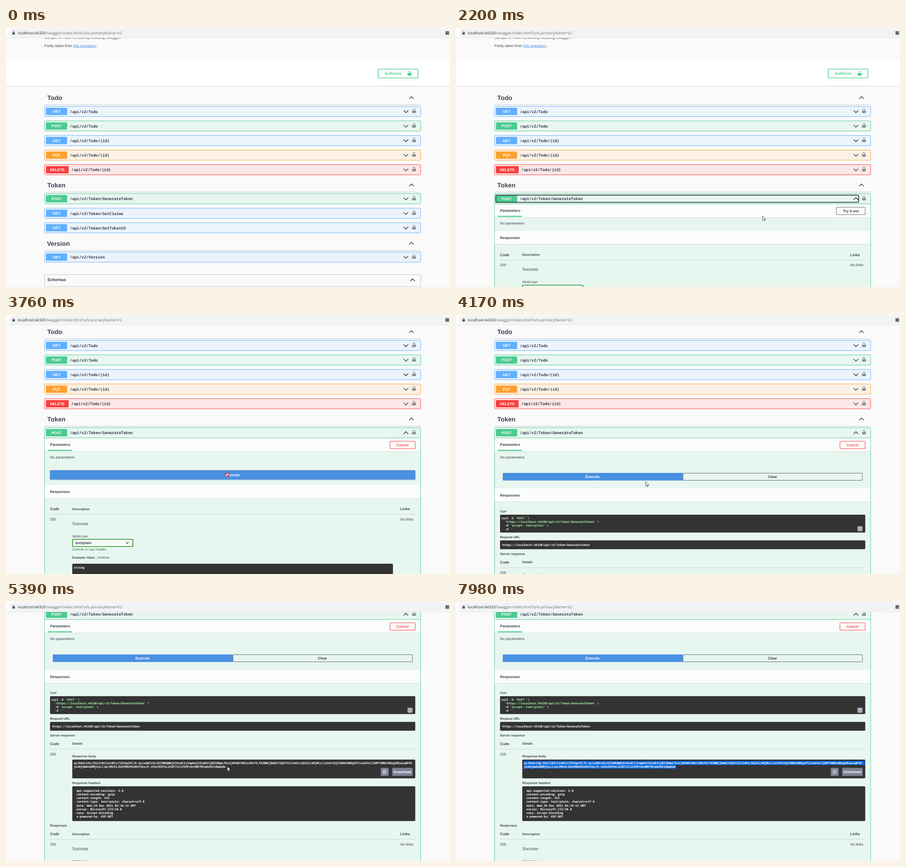
Animation, 978 px wide and 572 px high, one loop 8000 ms. Source, as an HTML page:

```html
<!DOCTYPE html>
<html lang="en">
<head>
<meta charset="utf-8">
<title>API page</title>
<style>
html, body { margin: 0; width: 100%; height: 100%; overflow: hidden; background: #fafafa; }
svg { display: block; width: 978px; height: 572px; }
text { font: 8.16px "Liberation Sans", Arial, sans-serif; fill: #3b4151; white-space: pre; text-rendering: geometricPrecision; }
.b { font-weight: 700; }
.h { font-size: 13.9px; font-weight: 700; }
.m { font-size: 9.33px; }
.s { font-size: 7px; }
.i { font-style: italic; }
.w { fill: #fff; }
.mid { text-anchor: middle; }
.path { font: 700 8.55px "Noto Sans Mono", "DejaVu Sans Mono", monospace; }
.code { font: 700 6.42px "Noto Sans Mono", "DejaVu Sans Mono", monospace; fill: #fff; }
.url { font: 8.34px "Open Sans", "Noto Sans", sans-serif; fill: #6a6e72; }
.str { fill: #a2fca2; }
.ok { fill: #1c6b3c; }
.lt { font: 6.4px "Noto Sans Mono", monospace; }
</style>
</head>
<body>
<svg id="stage" viewBox="0 0 978 572"></svg>
<script>
const LOOP = 8000;
const BLUE = '#61affe', GREEN = '#49cc90', ORANGE = '#fca130', RED = '#f93e3e';

// ---- drawing helpers ----
const text = (x, y, s, cls = '') => `<text x="${x}" y="${y}" class="${cls}">${s}</text>`;
const rect = (x, y, w, h, fill, more = '') => `<rect x="${x}" y="${y}" width="${w}" height="${h}" fill="${fill}" ${more}/>`;
const group = (id, body) => `<g id="${id}">${body}</g>`;
const frame = (x, y, w, h, color, width = 1.3, fill = 'none') =>
  rect(x, y, w, h, fill, `rx="2" stroke="${color}" stroke-width="${width}"`);
const rule = (y, x1 = 84.5, x2 = 913.5, color = '#3b415148') =>
  `<path d="M${x1} ${y}H${x2}" stroke="${color}" stroke-width=".9"/>`;
const chevron = (x, y, up, r = 5) => {
  const d = up ? -r : r;
  return `<path d="M${x - r} ${y - d / 2}l${r} ${d} ${r} ${-d}" fill="none" stroke="#222" stroke-width="1.25"/>`;
};
const lock = (x, y, color) => `<path d="M${x + 6.3} ${y + 5}v-2.1a2.1 2.1 0 0 0-4.2 0v.6" fill="none" stroke="${color}" stroke-width="1.3"/>`
  + rect(x, y + 4.7, 8.4, 5.3, color, 'rx=".8"');
const dark = (x, y, w, h) => rect(x, y, w, h, '#333', 'rx="2"');
const copyButton = (x, y, w, h) => {
  const cx = x + w / 2, cy = y + h / 2;
  return rect(x, y, w, h, '#7d8293', 'rx="2"')
    + `<path d="M${cx + 1} ${cy + 4}h-4.5v-7.5h7v3M${cx - 2} ${cy - 1.5}h4M${cx - 2} ${cy + 1}h2M${cx + 4.5} ${cy + 1.5}h-4l1.5-1.5m-1.5 1.5l1.5 1.5" fill="none" stroke="#fff" stroke-width=".9"/>`;
};

const rowBox = (c, color, h = 22.6) =>
  rect(84.9, c - 11.3, 828.4, h, color, `fill-opacity=".1" rx="2"`) + frame(84.9, c - 11.3, 828.4, h, color, .95);
const rowLabel = (c, color, verb, path) => {
  const w = verb === 'DELETE' ? 50 : 46.7;
  return rect(88, c - 8, w, 16, color, 'rx="1.7"') + text(88 + w / 2, c + 3, verb, 'b w mid')
    + text(94 + w, c + 3.4, '/api/v2/' + path, 'path') + lock(894.4, c - 6.5, '#8a8d90');
};
const row = (c, color, verb, path) => rowBox(c, color) + rowLabel(c, color, verb, path) + chevron(881, c + .2);
const section = (y, name) => text(name === 'Version' ? 90.2 : 91, y + 4.9, name, 'h') + chevron(893, y - .4, true) + rule(y + 15.2);
const panelHead = y => rect(85.4, y, 827.4, 29.4, '#fff', 'fill-opacity=".82"') + rule(y + 29.6, 85.4, 912.8, '#00000020');

// ---- page ----
const intro = text(84.5, 24, 'Sample API with versioning including Swagger.')
  + text(84.5, 41.5, 'Partly taken from <tspan fill="#4990e2" text-decoration="underline">this repository</tspan>.')
  + rect(0, 71.5, 978, 57, '#fff') + rule(128.6, 0, 978, '#0000002c')
  + frame(819.8, 90.6, 87.6, 19.8, GREEN, 1.4, '#fff')
  + `<g style="--c:${GREEN}">` + text(833.8, 103.4, 'Authorize', 'b').replace('<text', `<text style="fill:${GREEN}"`) + '</g>'
  + lock(884.8, 95, GREEN);

const todo = section(154.3, 'Todo')
  + row(184.3, BLUE, 'GET', 'Todo') + row(216.4, GREEN, 'POST', 'Todo')
  + row(248.6, BLUE, 'GET', 'Todo/{id}') + row(280.7, ORANGE, 'PUT', 'Todo/{id}')
  + row(312.9, RED, 'DELETE', 'Todo/{id}') + section(347.2, 'Token');

const closed = rowBox(377, GREEN) + chevron(881, 377.2)
  + row(409.2, BLUE, 'GET', 'Token/GetClaims') + row(441.3, BLUE, 'GET', 'Token/GetTokenID')
  + section(476, 'Version') + row(506, BLUE, 'GET', 'Version')
  + frame(84.9, 544.5, 828.4, 26.6, '#3b41514d', .9) + text(91.2, 559.2, 'Schemas', 'm b') + chevron(895.5, 556.5, true);

const table = text(97, 0, 'Code', 'b') + text(146, -.2, 'Description', 's b') + text(868.5, 0, 'Links', 'b')
  + rule(9, 97, 901.5, '#3b415133') + text(97, 22.8, '200') + text(868.5, 22.8, 'No links', 'i')
  + text(146, 32.8, 'Success', 'm') + text(146, 59.6, 'Media type', 's')
  + frame(146.5, 64.4, 133, 16, 'green', 1.4, '#f7fbf9') + text(152.5, 75.2, 'text/plain', 'b') + chevron(267.3, 72.4, false, 2.6)
  + text(146, 89, 'Controls <tspan class="ok lt">Accept</tspan> header.', 's ok')
  + text(146, 107.4, 'Example Value', 's b') + rule(0, 0, 0) + rect(198, 100.5, .8, 9, '#3b415166') + text(202, 107.4, 'Schema', 's')
  + dark(146, 118.2, 706.3, 60) + text(149.5, 128.6, 'string', 'code');

const open = rowBox(377, GREEN, 900) + rule(388.5, 85, 913, GREEN) + panelHead(389) + chevron(881, 377.2, true)
  + text(97, 406.4, 'Parameters', 'b') + rect(92, 414.8, 53.5, 2.3, GREEN) + text(97, 434.4, 'No parameters')
  + group('tryout', frame(838, 395.8, 63.4, 16.4, '#808389', 1.2) + text(869.7, 406.6, 'Try it out', 'b mid'))
  + group('cancel', frame(845.7, 395.8, 55.6, 16.4, '#ff6060', 1.3)
    + text(873.3, 406.6, 'Cancel', 'b mid').replace('<text', '<text style="fill:#f55"'))
  + group('form', rect(97, 460, 804.5, 20.6, '#4990e2', 'rx="2"') + text(499.2, 473.2, 'Execute', 'b w mid'))
  + group('press', frame(96.5, 459.5, 805.5, 21.6, '#00000030', 1.2))
  + group('respHead', panelHead(0) + text(97, 17.7, 'Responses', 'b')) + group('table', table);

// ---- server answer ----
const URL_TEXT = 'https://localhost:44320/api/v2/Token/GenerateToken';
const str = s => `<tspan class="str">'${s}'</tspan>`;
const curl = [`curl -X ${str('POST')} \\`, `  ${str(URL_TEXT)} \\`, `  -H ${str('accept: text/plain')} \\`, `  -d ${str('')}`];
const token = [
  'eyJhbGciOiJIUzI1NiIsInR5cCI6IkpXVCJ9.eyJzdWIiOiJUZXN0QWNjb3VudCIsImp0aSI6ImE4ZjM2ZWQwLTkzZjMtNGY4Ni1iMzY5LTA3MWZjNmRlY2Q3YSIsInR1c3QiOiIxMjMiLCJuYmYiOjE2NDA3NDQyOTIsImV4cCI6MTY0MDc0Nzg5MiwiaWF0I',
  'joxNjQwNzQ0MjkyLCJpc3MiOiJKd3RBdXRoRGVtbyJ9.vUSnZEOfeL2CWYI1CzV3OFn4vGMEYBtqGnG5tdbpbdo'];
const headers = ['api-supported-versions: 2.0', 'content-encoding: gzip', 'content-length: 415',
  'content-type: text/plain; charset=utf-8', 'date: Wed,29 Dec 2021 02:18:12 GMT',
  'server: Microsoft-IIS/10.0', 'vary: Accept-Encoding', 'x-powered-by: ASP.NET'];
const lines = (x, y, list) => list.map((s, i) => text(x, y + i * 8.17, s, 'code')).join('');

const done = rect(103, 465.8, 397, 16.8, '#4990e2', 'rx="1.5"') + frame(500, 466.3, 395.3, 15.8, '#7c8086', 1.2)
  + text(300.7, 477, 'Execute', 'b w mid') + text(697, 477, 'Clear', 'b mid')
  + text(97, 553.2, 'Curl', 's b') + dark(97, 558, 804.5, 39.5) + lines(100, 567.7, curl) + copyButton(884, 583, 12, 12)
  + text(97, 609.8, 'Request URL', 's b') + dark(97, 614.8, 804.5, 19.4) + text(102.3, 626.7, URL_TEXT, 'code')
  + text(97, 646.6, 'Server response', 's b') + text(97, 666, 'Code', 'b') + text(146, 665.4, 'Details', 's b')
  + rule(675, 97, 901.5, '#3b415133') + text(97, 689, '200')
  + text(146, 693.2, 'Response body', 's b') + dark(146, 698, 755.5, 41.6)
  + rect(149, 701, 0, 8.8, '#0a67dc', 'id="sel1"') + rect(149, 709.6, 0, 8.4, '#0a67dc', 'id="sel2"')
  + lines(149.2, 707.7, token) + copyButton(825.5, 716.3, 17.5, 18)
  + rect(850.5, 716.3, 45.5, 18, '#7d8293', 'rx="2"') + text(873, 727.6, 'Download', 'b w mid')
  + text(146, 752.2, 'Response headers', 's b') + dark(146, 757, 755.5, 76.8) + lines(155.1, 768.9, headers)
  + text(97, 845.8, 'Responses', 's b');

const bar = rect(0, 0, 978, 22, '#fff') + rect(6, 1, 985, 19.5, '#f1f3f4', 'rx="9.7"') + rule(21.6, 0, 978, '#dcdee0')
  + rect(14, 9.8, 5.6, 4.6, '#55595e', 'rx=".6"')
  + '<path d="M15.2 10V8.8a1.6 1.6 0 0 1 3.2 0V10" fill="none" stroke="#55595e" stroke-width=".9"/>'
  + text(26, 13.9, '<tspan fill="#26292c">localhost:44320</tspan>/swagger/index.html?urls.primaryName=V2', 'url')
  + rect(968, 7, 8, 8, '#6a6e72');

const edge = 'fill="#fff" stroke="#222" stroke-width=".8" stroke-linejoin="round"';
const cursors = {
  arrow: `<path d="M0 0v9.8l2.3-2.1 1.5 3.5 1.6-.7-1.5-3.4h3.1z" ${edge}/>`,
  hand: `<path d="M-1 1a1 1 0 0 1 2 0v4l3.6.8q1.1.4.9 1.6l-.8 4.4h-5.2l-2.9-4.2q-.3-1 .8-1l1.6 1z" ${edge}/>`,
  stop: '<circle r="3.9" fill="#fff" stroke="#c8141e" stroke-width="1.5"/><path d="M-2.7-2.7l5.4 5.4" stroke="#c8141e" stroke-width="1.5"/>',
  beam: '<path d="M-2-5q2 0 2 1.2Q0-5 2-5M0-4v8M-2 5q2 0 2-1.2Q0 5 2 5" fill="none" stroke="#ccd" stroke-width="1"/>'
};

const $ = id => document.getElementById(id);
$('stage').innerHTML = rect(0, 0, 978, 572, '#fafafa')
  + group('page', intro + todo + group('closed', closed) + group('open', open) + group('done', done)
    + rowLabel(377, GREEN, 'POST', 'Token/GenerateToken')
    + group('focus', frame(87.6, 369.3, 799.3, 15.7, '#1b1f24', 1.5)))
  + bar + Object.keys(cursors).map(k => group(k, cursors[k])).join('');

// ---- motion ----
// bursts of change: start, end, number of steps
const bursts = [[0, 0, 1], [150, 230, 2], [550, 1350, 11], [1410, 1510, 2], [1670, 2420, 11], [2520, 3300, 11],
  [3400, 4170, 11], [4240, 5030, 11], [5110, 5870, 11], [5950, 6490, 8], [6660, 6730, 2], [6900, 6900, 1],
  [7130, 7280, 3], [7450, 7750, 5], [7900, 7980, 2]];
const scrollKeys = [[2988, 0], [3066, 3.5], [3144, 45], [3222, 88], [3300, 110], [3400, 117],
  [4240, 117], [4400, 180], [4560, 234], [4716, 234], [4800, 270], [4950, 340], [5030, 350]];
const mouseKeys = [[150, 867, 344], [550, 610, 0], [950, 380, 290], [1190, 290.5, 373], [1600, 290.5, 373],
  [2000, 530, 428], [2420, 843, 400], [2600, 843, 400], [3066, 580, 420.5], [3300, 510, 396], [3480, 487, 353],
  [3900, 487, 353], [4240, 400, 372], [4714, 293.5, 379], [5030, 293.5, 379], [5414, 487.5, 363.5],
  [5560, 430, 363], [5640, 392, 354], [5870, 298, 353], [5950, 280, 352], [6490, 149, 356],
  [6660, 152, 358], [6730, 150, 358], [6900, 149, 357], [7130, 152, 358], [7280, 154, 359],
  [7450, 175, 365], [7750, 428, 425], [7899, 158, 361], [7980, 185, 361]];
const looks = [[0, ''], [150, 'arrow'], [230, ''], [550, 'arrow'], [1000, 'hand'], [1740, 'arrow'], [2340, 'hand'],
  [2700, 'arrow'], [3460, 'hand'], [3690, 'stop'], [4000, 'arrow'], [5480, 'beam'], [7500, 'arrow'], [7890, 'beam']];

const last = (list, t) => list.filter(k => k[0] <= t).pop();
function stepped(t) {
  const [a, b, n] = last(bursts, t);
  if (n < 2) return a;
  const d = (b - a) / (n - 1);
  return a + d * Math.min(n - 1, Math.floor((t - a) / d + .35));
}
function along(keys, t, c) {
  const i = keys.findIndex(k => k[0] > t);
  if (i === 0) return keys[0][c];
  if (i < 0) return keys[keys.length - 1][c];
  const p = keys[i - 1], n = keys[i];
  return p[c] + (n[c] - p[c]) * (t - p[0]) / (n[0] - p[0]);
}
const show = (id, on) => { $(id).style.display = on ? '' : 'none'; };
const move = (id, x, y) => $(id).setAttribute('transform', `translate(${x} ${y})`);
function span(id, x, end) {
  $(id).setAttribute('x', x);
  $(id).setAttribute('width', Math.max(0, end - x));
}

function draw(now) {
  const t = stepped(now % LOOP + .01);
  const opened = t >= 1409, editing = t >= 2590, answered = t >= 4000;
  show('closed', !opened);
  show('open', opened);
  show('tryout', !editing);
  show('cancel', editing);
  show('form', editing && !answered);
  show('press', t >= 3690 && !answered);
  show('done', answered);
  show('focus', t >= 1265 && !editing);
  const head = answered ? 500 : editing ? 492.5 : 448;
  move('respHead', 0, head);
  move('table', 0, answered ? 865.2 : head + 55.5);
  move('page', 0, -along(scrollKeys, t, 1));

  const x = along(mouseKeys, t, 1), y = along(mouseKeys, t, 2), look = last(looks, t)[1];
  for (const k in cursors) show(k, k === look);
  if (look) move(look, x, y);

  const left = t >= 6480 ? 149 : Math.max(149, x), upper = y < 359.5 || t >= 6480;
  const selecting = t >= 5480;
  span('sel1', left, selecting && upper ? 900.5 : 0);
  span('sel2', upper ? 149 : left, selecting ? 484.5 : 0);
}
function tick() {
  draw(performance.now());
  requestAnimationFrame(tick);
}
tick();
</script>
</body>
</html>
```
